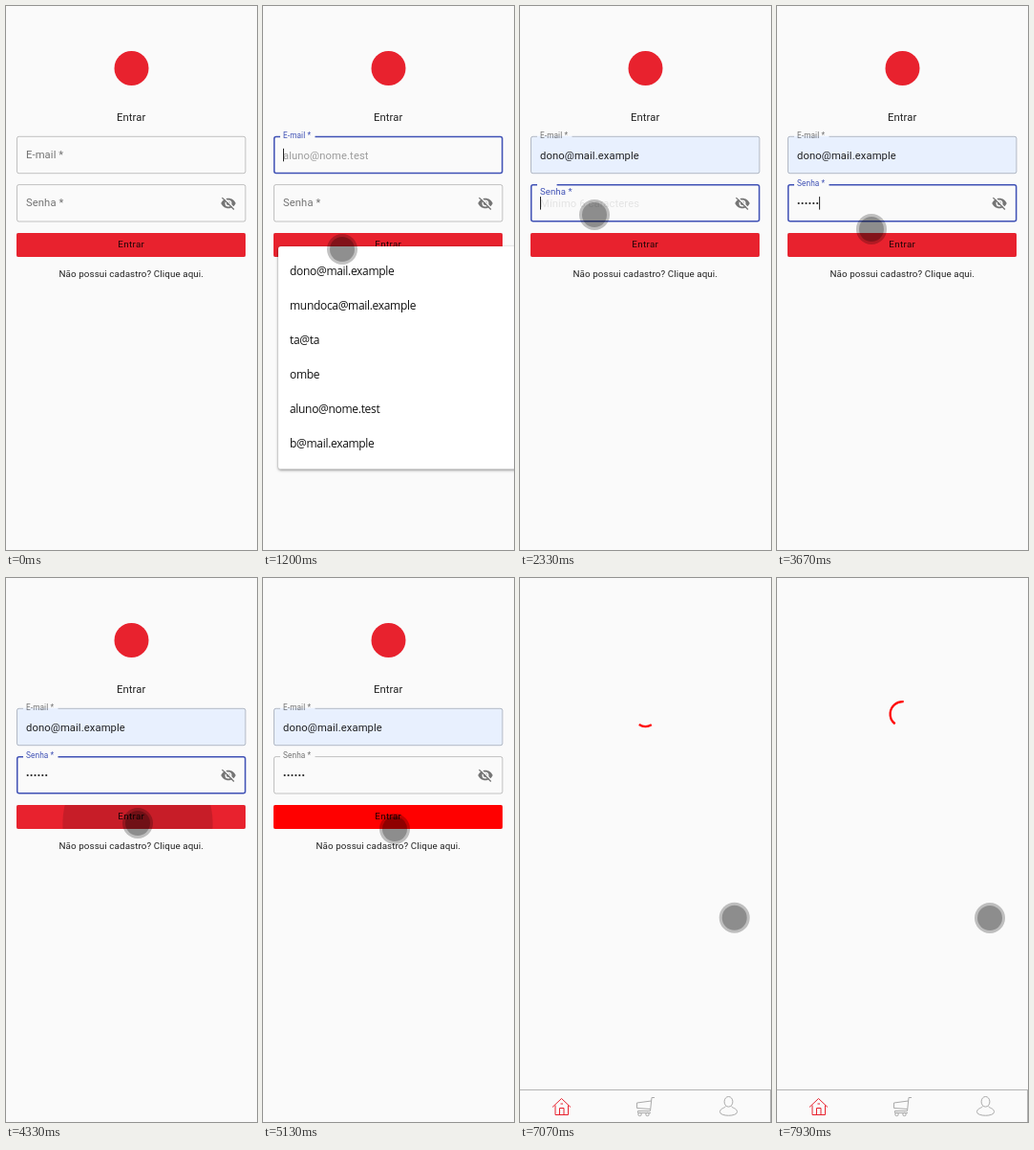
These frames come from a looping animation (263 by 568 pixels, 8000 ms). An HTML page:

```html
<!DOCTYPE html>
<html lang="pt-BR">
<head>
<meta charset="utf-8">
<title>Entrar</title>
<style>
  html, body { margin: 0; width: 100%; height: 100%; overflow: hidden; background: #fafafa; }
  svg { display: block; width: 100vw; height: 100vh; font-family: Roboto, sans-serif; }
  .body { font-size: 11.22px; letter-spacing: .1px; }
  .system { font-family: "Open Sans", "Noto Sans", sans-serif; }
  .dark { fill: rgba(0, 0, 0, .87); }
  .line { fill: none; stroke-width: 1; }
</style>
</head>
<body>
<svg viewBox="0 0 263 568">
  <rect width="263" height="568" fill="#fafafa"/>

  <g id="login">
    <circle cx="131.5" cy="65" r="18" fill="#e8222e"/>
    <text class="body dark" x="116" y="120">Entrar</text>
    <g id="email"></g>
    <g id="password"></g>
    <g id="dots" fill="#222"></g>
    <g transform="translate(224.6 197.6) scale(.7)">
      <path d="M1 12C2.7 7.6 7 4.5 12 4.5S21.3 7.6 23 12C21.3 16.4 17 19.5 12 19.5S2.7 16.4 1 12Z" fill="#757575"/>
      <circle cx="12" cy="12" r="5" fill="#fafafa"/>
      <circle cx="12" cy="12" r="3" fill="#757575"/>
      <path d="M4 2.2L22 20.2" stroke="#fafafa" stroke-width="2"/>
      <path d="M2.6 3.6L20.4 21.4" stroke="#757575" stroke-width="1.9"/>
    </g>
    <clipPath id="buttonShape"><rect x="11" y="237" width="240" height="25" rx="2"/></clipPath>
    <rect id="button" x="11" y="237" width="240" height="25" rx="2"
          style="filter: drop-shadow(0 .8px .7px rgba(0,0,0,.35))"/>
    <circle id="ripple" cx="138" cy="256" clip-path="url(#buttonShape)"/>
    <text class="dark" x="117.3" y="252" font-size="9.82" letter-spacing=".33">Entrar</text>
    <text class="dark" x="55.5" y="283" font-size="9.8" letter-spacing=".1">Não possui cadastro? Clique aqui.</text>
    <g id="suggestions" class="system" font-size="12" letter-spacing="-.32" fill="#111">
      <rect x="16" y="251" width="270" height="232.5" rx="2.8" fill="#fff"
            style="filter: drop-shadow(0 1px 1.6px rgba(0,0,0,.5))"/>
    </g>
  </g>

  <g id="home">
    <circle id="spinner" cx="131.5" cy="142" r="12.9" fill="none" stroke="#f00" stroke-width="2.3"/>
    <path class="line" d="M0 534.5H263M262.5 535V568" stroke="#b4b4b4"/>
    <g class="line" stroke="#e8222e" stroke-width="1.2">
      <path d="M34 552.5L43.5 543.5L53 552.5M37 550.5V560.5H50.5V550.5M41.5 560.5V553.5H46V560.5M42.5 549H45"/>
    </g>
    <g class="line" stroke="#aaa">
      <path d="M141 542.5H138L136.5 556.5H123.5M137.5 546L122.5 548V553.5L136.5 554.5M123.5 556.5V558.5H137"/>
      <circle cx="125.5" cy="560" r="1.7"/>
      <circle cx="133.5" cy="560" r="1.7"/>
      <ellipse cx="218.5" cy="546.8" rx="4.4" ry="5.3"/>
      <path d="M215.5 551.5C215 553.5 209.5 553.5 209.5 557.5C209.5 562.5 227.5 562.5 227.5 557.5C227.5 553.5 222 553.5 221.5 551.5"/>
    </g>
    <g id="dialog" class="system">
      <rect x="46.5" y="-10" width="240" height="204" rx="2" fill="#fff" stroke="#aaa"
            style="filter: drop-shadow(0 1px 1.5px rgba(0,0,0,.45))"/>
      <rect x="47" y="-9" width="230" height="26" fill="#f8f8f8"/>
      <rect class="line" x="159" y="-14" width="68" height="21" rx="4" stroke="#ddd"/>
      <text x="62.5" y="48" font-size="13.6" letter-spacing="-.33" fill="#202124">Mude sua senha</text>
      <g font-size="11" letter-spacing="-.26" fill="#5f6368">
        <text x="62.5" y="81">Sua senha foi exposta em uma violação de dados</text>
        <text x="62.5" y="99">você. Por recomendação do Domvra, mude</text>
        <text x="62.5" y="117">tray.surge.sh.</text>
      </g>
      <circle cx="71" cy="162" r="6.3" fill="none" stroke="#5f6368" stroke-width="1.4"/>
      <path d="M71 161.3V165.3M71 158.4V159.9" stroke="#5f6368" stroke-width="1.5"/>
    </g>
  </g>

  <g id="touch">
    <circle r="16" fill-opacity=".24"/>
    <circle r="13" fill-opacity=".26"/>
  </g>
</svg>

<script>
const LOOP = 8000, STEP = 1000 / 15;
const FOCUS_EMAIL = 760, PREVIEW = 1390, FILL = 1590, FOCUS_PASSWORD = 2285, BLUR = 4390;
const PAGE_CHANGE = 5463;
const KEY_TIMES = [2525, 2660, 2795, 3195, 3525, 3595];
const TOUCH_PATH = [
  [66, 176, 130], [400, 132, 167], [870, 132, 167], [1200, 83, 254], [1400, 105, 274],
  [1600, 105, 274], [1800, 42, 180], [1933, 78, 218], [3470, 78, 218], [3667, 99, 233],
  [4000, 138, 256], [5067, 138, 256], [5133, 138, 262], [5300, 138, 262], [5933, 229, 357],
  [6200, 229, 357], [6333, 242, 352], [6733, 242, 352], [7100, 223, 355]
];

const byId = id => document.getElementById(id);
const set = (el, attrs) => { for (const k in attrs) el.setAttribute(k, attrs[k]); };
const show = (el, on) => { el.style.display = on ? '' : 'none'; };
const mix = (a, b, p) => a + (b - a) * p;
const progress = (t, start, length) => Math.min(1, Math.max(0, (t - start) / length));
const easeOut = p => 1 - (1 - p) ** 3;
const easeInOut = p => p * p * (3 - 2 * p);
const between = (t, a, b) => t >= a && t < b;

// Outline drawn inside the box, with a gap in the top edge for the label.
function outline(top, width, gap) {
  const inset = width / 2, r = 2;
  const left = 11 + inset, right = 251.4 - inset, upper = top + inset, lower = top + 39.4 - inset;
  return `M${18 + gap} ${upper}H${right - r}a${r} ${r} 0 0 1 ${r} ${r}V${lower - r}a${r} ${r} 0 0 1 -${r} ${r}` +
         `H${left + r}a${r} ${r} 0 0 1 -${r} -${r}V${upper + r}a${r} ${r} 0 0 1 ${r} -${r}H18`;
}

function makeField(id, top, label, hint, value) {
  const group = byId(id);
  group.innerHTML = `
    <rect x="11" y="${top}" width="240.4" height="39.4" rx="2.5" fill="#e8f0fe"/>
    <path fill="none"/>
    <text class="body">${label}</text>
    <text class="body" x="21" y="${top + 24}">${hint}</text>
    <text class="body dark" x="21" y="${top + 24}">${value}</text>
    <path stroke="#222" stroke-width="1"/>`;
  const [fill, border, labelText, hintText, valueText, caret] = group.children;
  return ({ focus, focused, filled, hasText, caretX, caretOn }) => {
    const p = easeOut(focus), width = focused ? 1.5 : 1;
    show(fill, filled);
    show(valueText, filled);
    set(border, {
      d: outline(top, width, 36.5 * p),
      stroke: focused ? '#3f51b5' : 'rgba(0,0,0,.23)',
      'stroke-width': width
    });
    set(labelText, {
      transform: `translate(21 ${top + mix(23, 2, p)}) scale(${mix(1, .74, p)})`,
      fill: focused ? '#3f51b5' : 'rgba(0,0,0,.54)'
    });
    set(hintText, { 'fill-opacity': hasText ? 0 : .38 * focus });
    set(caret, { d: `M${caretX} ${top + 13}v13.5` });
    show(caret, caretOn);
  };
}

const drawEmail = makeField('email', 135.8, 'E-mail *', 'aluno@nome.test', 'dono@mail.example');
const drawPassword = makeField('password', 186.1, 'Senha *', 'Mínimo 6 caracteres', '');

byId('dots').innerHTML = KEY_TIMES.map((_, i) =>
  `<circle cx="${22.7 + 3.9 * i}" cy="206" r="1.1"/>`).join('');
byId('suggestions').innerHTML += [
  'dono@mail.example', 'mundoca@mail.example', 'ta@ta', 'ombe', 'aluno@nome.test', 'b@mail.example'
].map((name, i) => `<text x="28" y="${280.7 + 36 * i}">${name}</text>`).join('');

function touchAt(t) {
  const next = TOUCH_PATH.findIndex(point => point[0] > t);
  if (next < 0) return TOUCH_PATH.at(-1).slice(1);
  const [t0, x0, y0] = TOUCH_PATH[Math.max(0, next - 1)], [t1, x1, y1] = TOUCH_PATH[next];
  const p = progress(t, t0, t1 - t0 || 1);
  return [mix(x0, x1, p), mix(y0, y1, p)];
}

function drawLogin(t) {
  drawEmail({
    focus: progress(t, FOCUS_EMAIL, 200),
    focused: between(t, FOCUS_EMAIL, FOCUS_PASSWORD),
    filled: t >= PREVIEW,
    hasText: t >= PREVIEW,
    caretX: t < FILL ? 21.5 : 125.5,
    caretOn: between(t, FOCUS_EMAIL, 1290) || between(t, FILL, 2125)
  });
  const typed = KEY_TIMES.filter(time => t >= time).length;
  drawPassword({
    focus: progress(t, FOCUS_PASSWORD, 200),
    focused: between(t, FOCUS_PASSWORD, BLUR),
    filled: false,
    hasText: typed > 0,
    caretX: 21.5 + 3.85 * typed,
    caretOn: between(t, FOCUS_PASSWORD, 4125)
  });
  [...byId('dots').children].forEach((dot, i) => show(dot, i < typed));
  show(byId('suggestions'), between(t, 1000, FILL));

  const hover = progress(t, BLUR, 250);
  set(byId('button'), { fill: `rgb(${mix(232, 255, hover)},${mix(34, 0, hover)},${mix(46, 0, hover)})` });
  set(byId('ripple'), {
    r: 132 * easeOut(progress(t, 4190, 550)),
    'fill-opacity': .14 * (1 - progress(t, BLUR, 340))
  });
}

function drawHome(t) {
  show(byId('dialog'), between(t, 5730, 6795));
  const phase = ((t - PAGE_CHANGE) / 1400) % 1;
  const grow = easeInOut(progress(phase, 0, .5)), shrink = easeInOut(progress(phase, .5, .5));
  set(byId('spinner'), {
    pathLength: 126.9,
    'stroke-dasharray': `${1 + 99 * grow} 200`,
    'stroke-dashoffset': -(15 * grow + 110 * shrink),
    transform: `rotate(${360 * phase} 131.5 142)`
  });
}

function frame(now) {
  const t = Math.floor((now % LOOP + 5) / STEP) * STEP % LOOP;
  const atHome = t >= PAGE_CHANGE;
  show(byId('login'), !atHome);
  show(byId('home'), atHome);
  if (atHome) drawHome(t); else drawLogin(t);
  show(byId('touch'), t > 60);
  set(byId('touch'), { transform: `translate(${touchAt(t)})` });
  requestAnimationFrame(frame);
}
frame(0);
</script>
</body>
</html>
```
